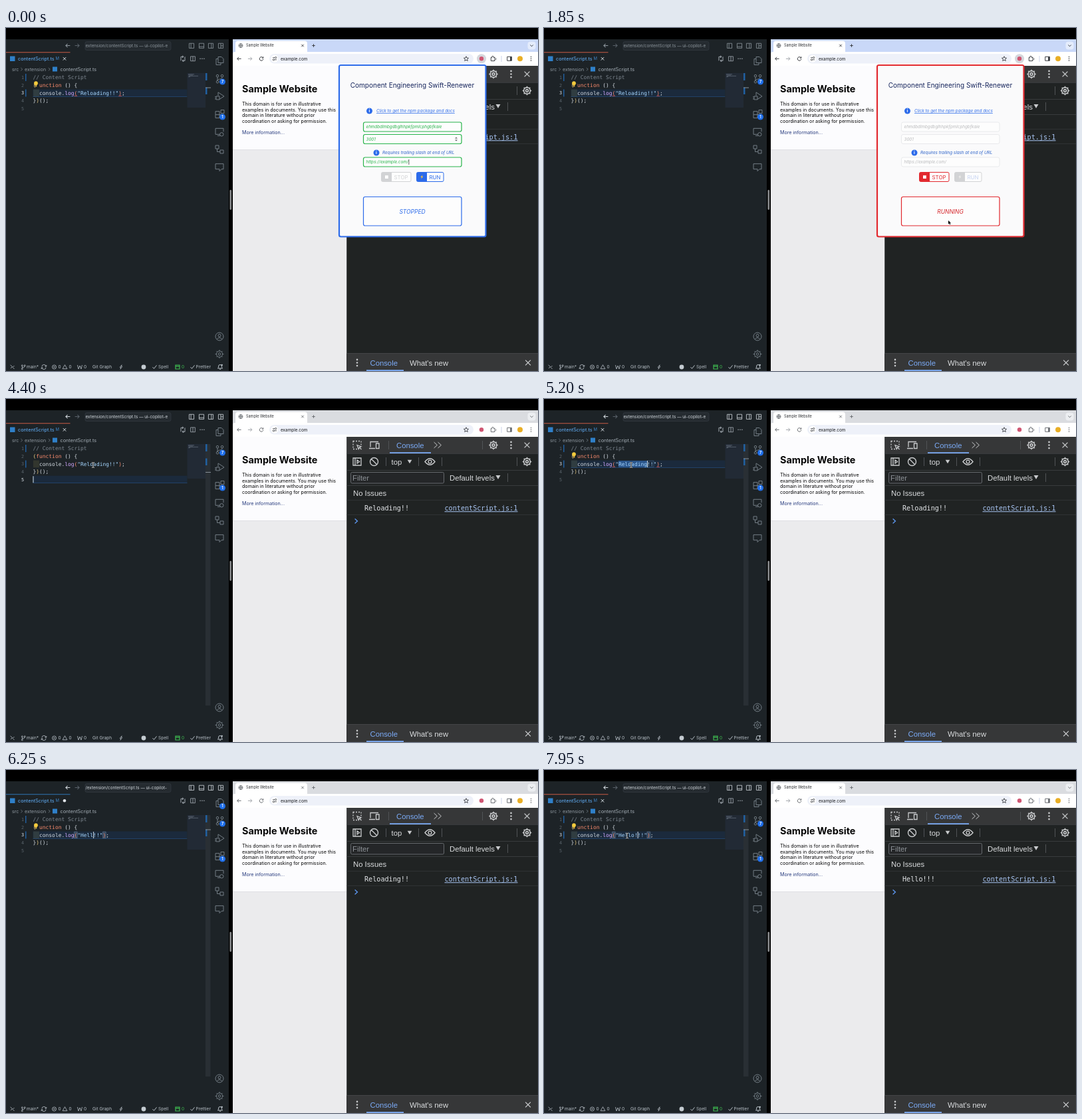
An HTML page with a canvas for the animation above (8000 ms loop, 800x517 px).

```html
<!DOCTYPE html>
<html lang="en">
<head>
<meta charset="utf-8">
<title>Reload demo</title>
<style>
  html, body { margin: 0; width: 100%; height: 100%; overflow: hidden; background: #000; }
  canvas { display: block; }
</style>
</head>
<body>
<canvas id="stage" width="800" height="517"></canvas>
<script>
const ctx = document.getElementById('stage').getContext('2d');
const UI = 'Inter, sans-serif';
const SANS = '"Liberation Sans", Arial, sans-serif';
const MONO = '"DejaVu Sans Mono", monospace';
const LOOP = 8000;
const RUN_AT = 1100, CLOSE_AT = 2450, FOCUS_AT = 3650, SELECT_AT = 4850;
const TYPE_AT = 5600, KEY_MS = 150, SAVE_AT = 7000, RELOAD_AT = 7250;
const CH = 4.77, CODE_X = 40.5, CODE_Y = 74.5, LINE_H = 11.7;

function box(x, y, w, h, { fill, stroke, r = 0, lw = 1 }) {
  ctx.beginPath();
  ctx.roundRect(x, y, w, h, r);
  if (fill) { ctx.fillStyle = fill; ctx.fill(); }
  if (stroke) { ctx.strokeStyle = stroke; ctx.lineWidth = lw; ctx.stroke(); }
}
const rect = (x, y, w, h, fill) => box(x, y, w, h, { fill });

function dot(x, y, r, fill) {
  ctx.beginPath();
  ctx.arc(x, y, r, 0, 7);
  ctx.fillStyle = fill;
  ctx.fill();
}

// y is the middle of the capital letters
function text(s, x, y, size, color, { font = UI, style = '', align = 'left' } = {}) {
  ctx.font = `${style} ${size}px ${font}`;
  ctx.textAlign = align;
  ctx.fillStyle = color;
  ctx.fillText(s, x, y + size * 0.36);
  return ctx.measureText(s).width;
}

function icon(d, x, y, color, { lw = 1, fill = false, scale = 1 } = {}) {
  ctx.save();
  ctx.translate(x, y);
  ctx.scale(scale, scale);
  const path = new Path2D(d);
  ctx.lineWidth = lw / scale;
  ctx.strokeStyle = ctx.fillStyle = color;
  if (fill) ctx.fill(path); else ctx.stroke(path);
  ctx.restore();
}

const circle = r => `M${r} 0A${r} ${r} 0 1 1 ${-r} 0A${r} ${r} 0 1 1 ${r} 0Z`;
const gearTeeth = Array.from({ length: 8 }, (_, i) => {
  const c = Math.cos(i * Math.PI / 4), s = Math.sin(i * Math.PI / 4);
  return `M${4.6 * c} ${4.6 * s}L${6.4 * c} ${6.4 * s}`;
}).join('');
const I = {
  back: 'M4 0H-3.5M-.5 -3.2L-3.7 0L-.5 3.2',
  forward: 'M-4 0H3.5M.5 -3.2L3.7 0L.5 3.2',
  close: 'M-3 -3L3 3M3 -3L-3 3',
  plus: 'M-3 0H3M0 -3V3',
  chevron: 'M-1.2 -2.2L1.2 0L-1.2 2.2',
  down: 'M-2.2 -1L0 1.2L2.2 -1',
  triangle: 'M-3.5 -3H3.5L0 3Z',
  panel: 'M-4 -4H4V4H-4Z',
  reload: 'M2.6 -1.6A3.1 3.1 0 1 0 3.1 .6M3.2 -3.4V-1.2H1',
  star: 'M0 -4L1.1 -1.3L4 -1.1L1.8 .8L2.5 3.6L0 2.1L-2.5 3.6L-1.8 .8L-4 -1.1L-1.1 -1.3Z',
  bolt: 'M1.5 -4L-2.4 .6H-.1L-1.4 4L2.4 -1H.2Z',
  check: 'M-3 .2L-1 2.4L3 -2.6',
  puzzle: 'M-3 -2H-1A1.3 1.3 0 1 1 1 -2H3V0A1.3 1.3 0 1 1 3 1.5V4H-3Z',
  gear: circle(4.6) + gearTeeth + circle(1.8),
  clear: circle(6) + 'M-4.2 -4.2L4.2 4.2',
  eye: 'M-7.5 0Q0 -9.5 7.5 0Q0 9.5 -7.5 0Z' + circle(2.4),
  inspect: 'M-6 -4V-6H-4M-2 -6H0M2 -6H4M6 -6V-4M6 -2V0M-6 -2V0M-6 2V4M-6 6H-4M-2 6H0M0 0L6 2.2L3.4 3.4L2.2 6ZM3.4 3.4L6.5 6.5',
  device: 'M-6 3V-5H6M-8 5H1M2.5 -2.5H7V5H2.5Z',
  files: 'M-2 -6H3L6 -3V3H-2ZM-2 -3H-5V6H2V3',
  branch: 'M-3 -2V3M4 -2C4 2 -3 0 -3 3M-1.2 -4A1.8 1.8 0 1 1 -4.8 -4A1.8 1.8 0 1 1 -1.2 -4M5.8 -4A1.8 1.8 0 1 1 2.2 -4A1.8 1.8 0 1 1 5.8 -4M-1.2 5A1.8 1.8 0 1 1 -4.8 5A1.8 1.8 0 1 1 -1.2 5',
  debug: 'M-2 -1V-6L7 0L0 4.5M-5 0H0V5H-5ZM-7 1H-5M-7 4H-5',
  blocks: 'M-6 -4H0V6H-6ZM-6 1H5V6H0M2 -6H7V-1H2Z',
  monitor: 'M1 4H-6V-5H6V0M-3 6H1M6 4A2.7 2.7 0 1 1 .6 4A2.7 2.7 0 1 1 6 4',
  flow: 'M-6 -6H-1V-1H-6ZM1 1H6V6H1ZM-3.5 -1V3.5H1',
  chat: 'M-6 -5H6V3H3L0 6V3H-6Z',
  person: circle(6) + 'M2 -1.5A2 2 0 1 1 -2 -1.5A2 2 0 1 1 2 -1.5M-4 4.3Q0 -.8 4 4.3',
  bell: 'M-3.5 2H3.5L2.5 .5V-1A2.5 2.5 0 0 0 -2.5 -1V.5ZM-1 3.3H1',
  warn: 'M0 -3L3.4 3H-3.4Z',
  arrow: 'M0 0V7.6L1.8 6L3 8.8L4.3 8.2L3.1 5.5H5.5Z',
  beam: 'M-2 -4Q0 -4 0 -2.8Q0 -4 2 -4M0 -2.8V2.8M-2 4Q0 4 0 2.8Q0 4 2 4'
};

// Mouse: time, x, y; eased between stops
const mousePath = [
  [500, 658, 262], [900, 645, 227], [1250, 645, 227], [1750, 608, 290], [2050, 608, 290],
  [2400, 476, 288], [2750, 461, 279], [3150, 461, 279], [3600, 172, 190], [3800, 172, 190],
  [4250, 131, 99.5], [7450, 131, 99.5], [7700, 125, 99]
];
function mouseAt(t) {
  if (t < mousePath[0][0] || (t > TYPE_AT && t < 7450)) return null;
  const next = mousePath.findIndex(p => p[0] > t);
  if (next < 0) return mousePath.at(-1).slice(1);
  const [t0, x0, y0] = mousePath[next - 1], [t1, x1, y1] = mousePath[next];
  const u = (t - t0) / (t1 - t0), k = u * u * (3 - 2 * u);
  return [x0 + (x1 - x0) * k, y0 + (y1 - y0) * k];
}

function stateAt(t) {
  const keys = Math.max(0, Math.min(6, Math.floor((t - TYPE_AT) / KEY_MS)));
  return {
    running: t >= RUN_AT, popup: t < CLOSE_AT, focused: t >= FOCUS_AT,
    line: t >= FOCUS_AT && t < SELECT_AT ? 5 : 3,
    selected: t >= SELECT_AT && !keys, typed: keys > 0,
    dirty: keys > 0 && t < SAVE_AT,
    word: keys ? 'Hello!'.slice(0, keys) : 'Reloading',
    log: t < RELOAD_AT ? 'Reloading!!' : t < RELOAD_AT + 100 ? '' : 'Hello!!!',
    mouse: mouseAt(t)
  };
}

function badge(x, y, label) {
  dot(x, y, 4.5, '#1f6feb');
  text(label, x, y, 5.5, '#fff', { align: 'center', style: 'bold' });
}

function drawCode(s) {
  const rowY = n => CODE_Y + (n - 1) * LINE_H;
  const colX = n => CODE_X + n * CH;
  const y = rowY(s.line);
  rect(40.5, y - 5.5, 232, 11, '#1b2a3c');
  rect(40.5, y + 5, 232, 0.8, '#234a78');
  rect(41, rowY(3) - 5.4, 9, 10.8, 'rgba(230,220,110,.1)');

  const closeCol = 15 + s.word.length + 3;
  if (s.selected) {
    rect(colX(15), y - 5, 9 * CH, 10, '#2b568c');
    box(colX(24) + 0.5, y - 4.7, 2 * CH, 9.4, { stroke: '#42658d', lw: 0.6 });
  }
  if (s.line === 3) {
    for (const col of [13, closeCol]) {
      if (s.typed) box(colX(col), y - 4.8, CH, 9.6, { fill: '#34485f', stroke: '#66788d', lw: 0.6 });
      else rect(colX(col), y + 4, CH, 0.8, '#d64c4c');
    }
  }

  const yellow = '#e8cb80', orange = '#f78a6c', blue = '#a5d6ff', pale = '#d3dae1';
  const lines = [
    [['// Content Script', '#7e8790']],
    [['(', yellow], ['function', orange], [' () {', pale]],
    [['  console.', pale], ['log', '#d2a8ff'], ['(', orange], [`"${s.word}!!"`, blue], [')', orange], [';', pale]],
    [['}', pale], [')', yellow], ['();', pale]],
    []
  ];
  lines.forEach((parts, i) => {
    const active = i + 1 === s.line;
    text(String(i + 1), 27, rowY(i + 1), 6.8, active ? '#e6edf3' : '#5b646d', { font: MONO, align: 'right' });
    let x = CODE_X;
    for (const [str, color] of parts) x += text(str, x, rowY(i + 1), 7.93, color, { font: MONO });
  });
  for (const n of [1, 3]) rect(29, rowY(n) - 5.5, 1.5, 11, '#215f9d');

  if (s.line === 3) {
    rect(45.3, 80, 4, 10.5, '#1d2327');
    dot(45, 83.2, 2.9, '#f5cb3d');
    rect(43.8, 86, 2.4, 2.5, '#d5ad43');
  }
  if (s.focused) {
    const col = s.line === 5 ? 0 : 15 + s.word.length;
    rect(colX(col), y - 5, 1, 10, '#d8e5f2');
  }
}

function drawEditor(s) {
  rect(0, 17, 335, 500, '#1d2327');
  const grey = '#a5adb4', dim = '#737d85';
  const titleInk = s.focused ? '#d5dbe0' : '#8f989f';
  icon(I.back, 93, 26.5, titleInk, { scale: 0.85 });
  icon(I.forward, 107, 26.5, '#596169', { scale: 0.85 });
  box(119, 20.5, 129, 13, { fill: '#252b30', stroke: '#343c42', r: 2.5, lw: 0.7 });
  ctx.save();
  ctx.beginPath();
  ctx.rect(119, 20, 128, 14);
  ctx.clip();
  text(s.dirty ? '/extension/contentScript.ts — ui-copilot-' : 'extension/contentScript.ts — ui-copilot-e', 119.5, 27, 6.35, titleInk);
  ctx.restore();
  for (const [x, d] of [[279, 'M-1 -4V4'], [294, 'M-4 1.5H4'], [308, 'M1 -4V4'], [323, 'M0 -4V4M0 0H4']]) {
    icon(I.panel + d, x, 26.8, titleInk, { lw: 0.8, scale: 0.9 });
  }

  rect(0, 36.3, 96.5, 1, s.dirty ? '#2f75b5' : '#c95b45');
  rect(6, 42.5, 7.5, 7.5, '#2f80c9');
  text('contentScript.ts', 18, 46.3, 7.3, '#62b0fa');
  text('M', 74.5, 46.3, 6, '#3f83c4');
  if (s.dirty) dot(88, 46.3, 2.3, '#e0e5ea');
  else icon(I.close, 88, 46.3, '#d5dce2', { scale: 0.75 });
  icon('M-3 3V-3H1M3 -3V3H-1M-1 -4.5L1 -3L-1 -1.5M1 1.5L-1 3L1 4.5', 266, 46.3, grey);
  icon(I.panel + 'M0 -4V4', 281, 46.3, grey, { lw: 0.8, scale: 0.85 });
  for (let i = -1; i < 2; i++) dot(295 + i * 2.9, 46.3, 0.8, grey);

  text('src', 9, 62, 7, '#929ba3');
  icon(I.chevron, 23.5, 62.2, dim, { lw: 0.8 });
  text('extension', 28, 62, 7, '#929ba3');
  icon(I.chevron, 65, 62.2, dim, { lw: 0.8 });
  rect(70, 58.5, 7, 7, '#2f80c9');
  text('contentScript.ts', 81.5, 62, 7.3, '#a4adb5');

  drawCode(s);

  rect(272.5, 68, 27.5, 52, '#222a35');
  for (const [i, w] of [9, 7, 14, 3].entries()) rect(274 + (i === 2 ? 1 : 0), 69.5 + i * 1.2, w, 0.7, '#66717e');
  if (s.focused) rect(300, 68, 7.5, 394, '#292f34');
  rect(300, 68, 2.5, 11, '#2160a1');
  rect(300, 89.5, 2.5, 10.5, '#2160a1');
  rect(300, s.line === 5 ? 110 : 89.5, 8, 1, '#879099');

  const side = [I.files, I.branch, I.debug, I.blocks, I.monitor, I.flow, I.chat];
  side.forEach((d, i) => icon(d, 321, 49.5 + i * 26.7, dim));
  icon(I.person, 321, 465, dim);
  icon(I.gear, 321, 491.5, dim);
  if (s.dirty) badge(325.5, 54.5, '1');
  badge(325.5, 81, '7');
  badge(325.5, 134, '1');

  const y = 511, st = '#b9c1c8';
  const label = (str, x, color = st) => text(str, x, y, 6.5, color);
  icon('M-3 -3L0 -.5L-2.5 2M3 -2L.5 .5L3 3', 9.5, y, st, { lw: 0.8 });
  icon(I.branch, 26, y, st, { lw: 0.8, scale: 0.55 });
  label('main*', 31);
  icon('M-3 -.5A3 3 0 0 1 3 -.7M3 .5A3 3 0 0 1 -3 .7M1.5 -1H3.8V-3M-1.5 1H-3.8V3', 57, y, st, { lw: 0.8 });
  icon(circle(3) + 'M-1.3 -1.3L1.3 1.3M1.3 -1.3L-1.3 1.3', 72.5, y, st, { lw: 0.8 });
  label('0', 78.5);
  icon(I.warn, 88.5, y - 0.3, st, { lw: 0.8 });
  label('0', 94.5);
  icon('M-3.5 -3L-2 3L0 -2L2 3L3.5 -3', 111, y, st, { lw: 0.8 });
  label('0', 117);
  label('Git Graph', 130);
  icon(I.bolt, 173, y, st, { lw: 0.7, scale: 0.8 });
  dot(207, y, 3.4, '#c4cbd1');
  icon(I.check, 223.5, y, st);
  label('Spell', 229);
  icon('M-3 -3H3V3H-3ZM-3 -1.2H3', 258, y, '#3fb950', { lw: 1.2 });
  label('0', 264, '#3fb950');
  icon(I.check, 280.5, y, st);
  label('Prettier', 285.5);
  icon(I.bell, 322, y, st);
  dot(324.7, 508, 1.2, st);
}

function drawBrowser(s) {
  rect(341, 17, 459, 40, s.focused ? '#dadce0' : '#c9d8f8');
  box(345, 19.5, 108, 22, { fill: '#fff', r: 4 });
  box(341, 36, 459, 21, { fill: '#fff', r: [3, 0, 0, 0] });
  const ink = s.focused ? '#6c6f74' : '#3a3d42';
  icon(circle(3) + 'M-3 0H3M0 -3Q-2.5 0 0 3Q2.5 0 0 -3', 353, 26.5, '#62666b', { lw: 0.8 });
  text('Sample Website', 361, 26.5, 5.5, '#2b2d31');
  icon(I.close, 446, 26.5, ink, { lw: 0.9, scale: 0.6 });
  icon(I.plus, 462.5, 26.5, ink, { scale: 0.75 });
  box(784.5, 20.5, 12, 12, { fill: s.focused ? '#eceef1' : '#e4ecfc', r: 4 });
  icon(I.down, 790.5, 26.5, ink);

  icon(I.back, 350.5, 46.3, ink, { scale: 0.78 });
  icon(I.forward, 367, 46.3, '#a2a5aa', { scale: 0.78 });
  icon(I.reload, 384, 46.3, ink, { scale: 0.9 });
  box(396, 39, 307, 14.5, { fill: '#eef1f9', r: 7.25 });
  dot(404, 46.2, 5.5, '#fff');
  icon('M-3 -1.6H0M3 1.6H0M2.8 -1.6A1.2 1.2 0 1 1 .4 -1.6A1.2 1.2 0 1 1 2.8 -1.6M-.4 1.6A1.2 1.2 0 1 1 -2.8 1.6A1.2 1.2 0 1 1 -.4 1.6', 404, 46.2, '#3a3d42', { lw: 0.8 });
  text('example.com', 413, 46.3, 6.4, '#16181b');
  icon(I.star, 692, 46.3, '#3a3d42', { lw: 0.9, scale: 0.9 });
  if (s.popup) dot(715, 46.3, 7, '#d5d7dc');
  dot(715, 46.3, 3.2, '#cf5672');
  icon(I.puzzle, 732, 46, ink, { lw: 1, scale: 0.9 });
  rect(744.5, 42, 1, 9, '#cbd3ea');
  icon('M-3.3 -3H3.3V3H-3.3Z', 757, 46.3, ink);
  rect(758, 43.3, 2.5, 6, ink);
  dot(773, 46.3, 4, '#e9ae25');
  for (let i = -1; i < 2; i++) dot(789.5, 46.3 + i * 2.8, 0.8, ink);

  rect(341, 57, 171, 460, '#ebebed');
  rect(341, 183, 171, 1.2, '#e2e2e5');
  rect(341, 57, 171, 126, '#fcfcfe');
  text('Sample Website', 355, 91.5, 14.4, '#050505', { style: 'bold' });
  const copy = ['This domain is for use in illustrative', 'examples in documents. You may use this',
    'domain in literature without prior', 'coordination or asking for permission.'];
  copy.forEach((str, i) => text(str, 355, 114.3 + i * 8.8, 7.15, '#050505'));
  text('More information...', 355, 157, 7.15, '#25397c');
}

function drawDevtools(s) {
  const bar = '#363738', rule = '#4c4e50', ink = '#c9cbcd', blue = '#7cacf8';
  const label = (str, x, y, color = '#dadcde') => text(str, x, y, 11.3, color, { font: SANS });
  rect(512, 57, 288, 460, '#202323');
  rect(512, 57, 288, 25, bar);
  rect(512, 57, 1, 460, rule);
  for (const y of [82, 107, 130, 152, 174]) rect(512, y, 288, 0.8, y > 130 ? '#34373a' : '#404346');
  icon(I.inspect, 528, 69.5, ink, { lw: 1.3 });
  icon(I.device, 554, 69.5, ink, { lw: 1.3 });
  label('Console', 587, 70, blue);
  rect(577, 80.2, 62, 1.8, blue);
  for (const x of [646, 652]) icon(I.chevron, x, 69.5, ink, { lw: 1, scale: 2 });
  icon(I.gear, 733, 69.5, ink, { lw: 1.6, scale: 1.05 });
  for (let i = -1; i < 2; i++) dot(759.5, 69.5 + i * 4.6, 1.3, ink);
  icon(I.close, 783.5, 69.5, ink, { lw: 1.3, scale: 1.3 });

  icon('M-6 -5.5H6V5.5H-6ZM-3 -5.5V5.5M0 -2.5L3.5 0L0 2.5Z', 528, 94.5, ink, { lw: 1.3 });
  icon(I.clear, 553.5, 94.5, ink, { lw: 1.4 });
  label('top', 579.5, 95);
  icon(I.triangle, 607, 94.5, ink, { fill: true, scale: 0.95 });
  icon(I.eye, 637.5, 94.5, ink, { lw: 1.4 });
  icon(I.gear, 783.5, 94.5, ink, { lw: 1.6, scale: 1.05 });
  for (const [x, y] of [[575, 63], [716, 63], [571, 88], [620, 88], [655, 88], [768, 88], [754, 112]]) rect(x, y, 1, 13, '#505356');

  box(518.5, 110.5, 140, 16.5, { fill: '#242628', stroke: '#65696d', r: 2 });
  label('Filter', 521, 119, '#8d9297');
  label('Default levels', 667, 119);
  icon(I.triangle, 740, 118, ink, { fill: true });
  label('No Issues', 522, 141.5);

  if (s.log) {
    text(s.log, 539, 164, 10.15, '#e2e5e8', { font: MONO });
    text('contentScript.js:1', 659.5, 164, 10.15, '#a9c6f4', { font: MONO });
    rect(659.5, 169.3, 110, 0.9, '#a9c6f4');
  }
  icon(I.chevron, 526.5, 184, '#5c96ee', { lw: 1.4, scale: 1.6 });

  rect(512, 490.5, 288, 26.5, bar);
  rect(512, 490, 288, 0.8, rule);
  for (let i = -1; i < 2; i++) dot(528, 504.5 + i * 4.6, 1.3, ink);
  label('Console', 547.5, 504.5, blue);
  rect(542, 515.3, 56, 1.7, blue);
  label("What's new", 607, 504.5);
  icon(I.close, 785, 504.5, ink, { lw: 1.3, scale: 1.3 });
}

function drawPopup({ running }) {
  const blue = '#2c6bea', red = '#e2292f', green = '#28b44b', off = '#d2d3d5';
  const main = running ? red : blue;
  const italic = { style: 'italic' };
  box(501, 56, 220.5, 258.5, { fill: '#fafafb', stroke: main, r: 2.5, lw: 2.2 });
  text('Component Engineering Swift-Renewer', 611, 86.5, 10, '#17265d', { align: 'center' });

  const info = (x, y) => {
    dot(x, y, 4.5, blue);
    text('i', x, y, 6.5, '#fff', { align: 'center', style: 'bold' });
  };
  info(546.5, 125);
  const w = text('Click to get the npm package and docs', 557, 124.5, 6.35, blue, italic);
  rect(557, 128.3, w, 0.6, blue);
  info(557, 188);
  text('Requires trailing slash at end of URL', 566, 188, 6.3, '#2c62c9', italic);

  const field = (str, y) => {
    box(537.5, y - 7, 147.5, 14, { fill: '#fdfdfd', stroke: running ? '#e4e5e7' : green, r: 2.5, lw: running ? 0.8 : 1.2 });
    return text(str, 541.5, y, 6.3, running ? '#b9babc' : green, italic);
  };
  field('ehmdbdlmbgdbglhhpkfpmlcphgbfkaie', 149);
  field('3001', 167.5);
  const urlWidth = field('https://example.com/', 202);
  if (!running) {
    rect(542 + urlWidth, 198, 0.7, 8, '#222');
    icon('M-2 -1L0 -3L2 -1ZM-2 1L0 3L2 1Z', 677, 167.5, '#5c5e61', { fill: true });
  }

  const button = (x, width, str, color, textColor) => {
    box(x, 217.5, width, 14, { fill: '#fdfdfd', stroke: color, r: 2, lw: 1 });
    box(x, 217.5, 15.5, 14, { fill: color, r: [2, 0, 0, 2] });
    text(str, x + 19, 224.7, 7.9, textColor);
  };
  button(564.5, 44.5, 'STOP', running ? red : off, running ? red : off);
  rect(570, 222.2, 4.8, 4.8, '#fff');
  button(617.5, 40.5, 'RUN', running ? off : blue, running ? '#c5d3f2' : blue);
  icon(I.bolt, 625.3, 224.5, running ? '#eeeeec' : '#ffc43b', { fill: true, scale: 0.85 });

  box(537.5, 254.5, 147.5, 43.5, { fill: '#fdfdfd', stroke: main, r: 2.5, lw: 1.2 });
  text(running ? 'RUNNING' : 'STOPPED', 611, 276.5, 8.5, running ? '#d5262b' : blue, { style: 'italic', align: 'center' });
}

function drawMouse([x, y]) {
  if (x < 300) {
    icon(I.beam, x, y, '#111', { lw: 1.8 });
    icon(I.beam, x, y, '#e6e6e6', { lw: 0.9 });
  } else {
    icon(I.arrow, x, y, '#fff', { lw: 1.4, scale: 0.75 });
    icon(I.arrow, x, y, '#000', { fill: true, scale: 0.75 });
  }
}

function frame() {
  const s = stateAt(performance.now() % LOOP);
  rect(0, 0, 800, 517, '#000');
  drawEditor(s);
  box(336.5, 244, 2.6, 30, { fill: '#8a8c8e', r: 1.3 });
  drawBrowser(s);
  drawDevtools(s);
  if (s.popup) drawPopup(s);
  if (s.mouse) drawMouse(s.mouse);
  requestAnimationFrame(frame);
}
frame();
</script>
</body>
</html>
```
